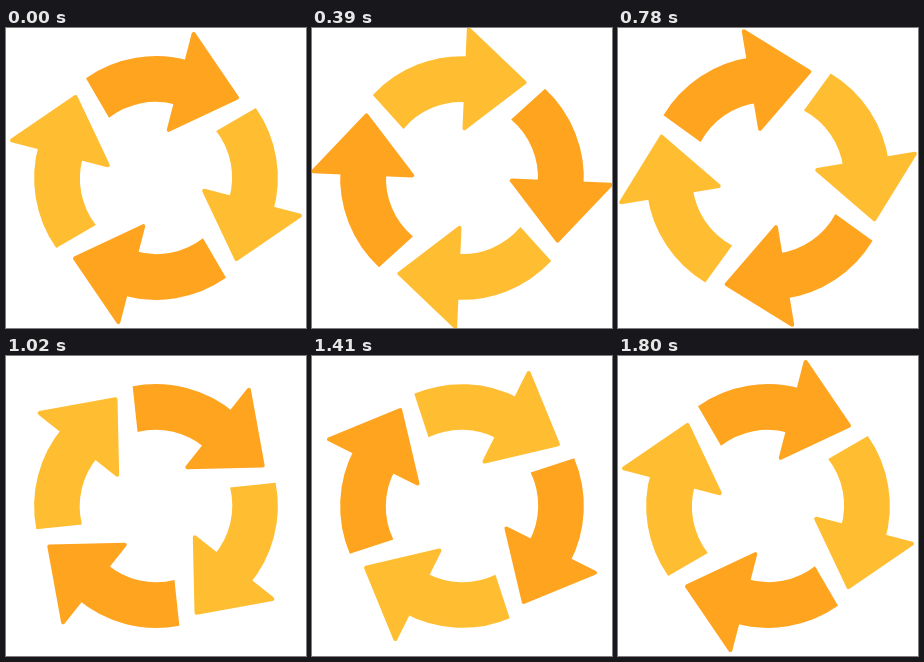
Write an HTML page that moves like this. It is 300x300 px and loops after 1.83 s.

```html
<!DOCTYPE html>
<html lang="en">
<head>
<meta charset="utf-8">
<title>Turning arrows</title>
<style>
  html, body { margin: 0; width: 100%; height: 100%; overflow: hidden; background: #fff; }
  svg { display: block; width: 100%; height: 100%; }
  .dark { fill: #ffa41f; stroke: #ffa41f; }
  .light { fill: #ffbe32; stroke: #ffbe32; }
</style>
</head>
<body>
<svg viewBox="0 0 300 300">
  <defs>
    <g id="arrow">
      <path stroke="none" d="M80 50.2A122 122 0 0 1 184 33L171 77A76 76 0 0 0 103 89.8Z"/>
      <path stroke-width="4" stroke-linejoin="round" d="M187.6 6L231 69.6L162.8 101.8Z"/>
    </g>
  </defs>
  <g id="ring">
    <use href="#arrow" class="dark"/>
    <use href="#arrow" class="light" transform="rotate(90 150 150)"/>
    <use href="#arrow" class="dark" transform="rotate(180 150 150)"/>
    <use href="#arrow" class="light" transform="rotate(270 150 150)"/>
  </g>
</svg>
<script>
  const LOOP = 1830, STEP = 30, TURN = 6; // ms, ms, degrees per step
  const ring = document.getElementById('ring');
  const start = performance.now();

  function draw() {
    const time = (performance.now() - start) % LOOP;
    const angle = Math.floor(time / STEP) * TURN;
    ring.setAttribute('transform', `rotate(${angle} 150 150)`);
    requestAnimationFrame(draw);
  }
  draw();
</script>
</body>
</html>
```
